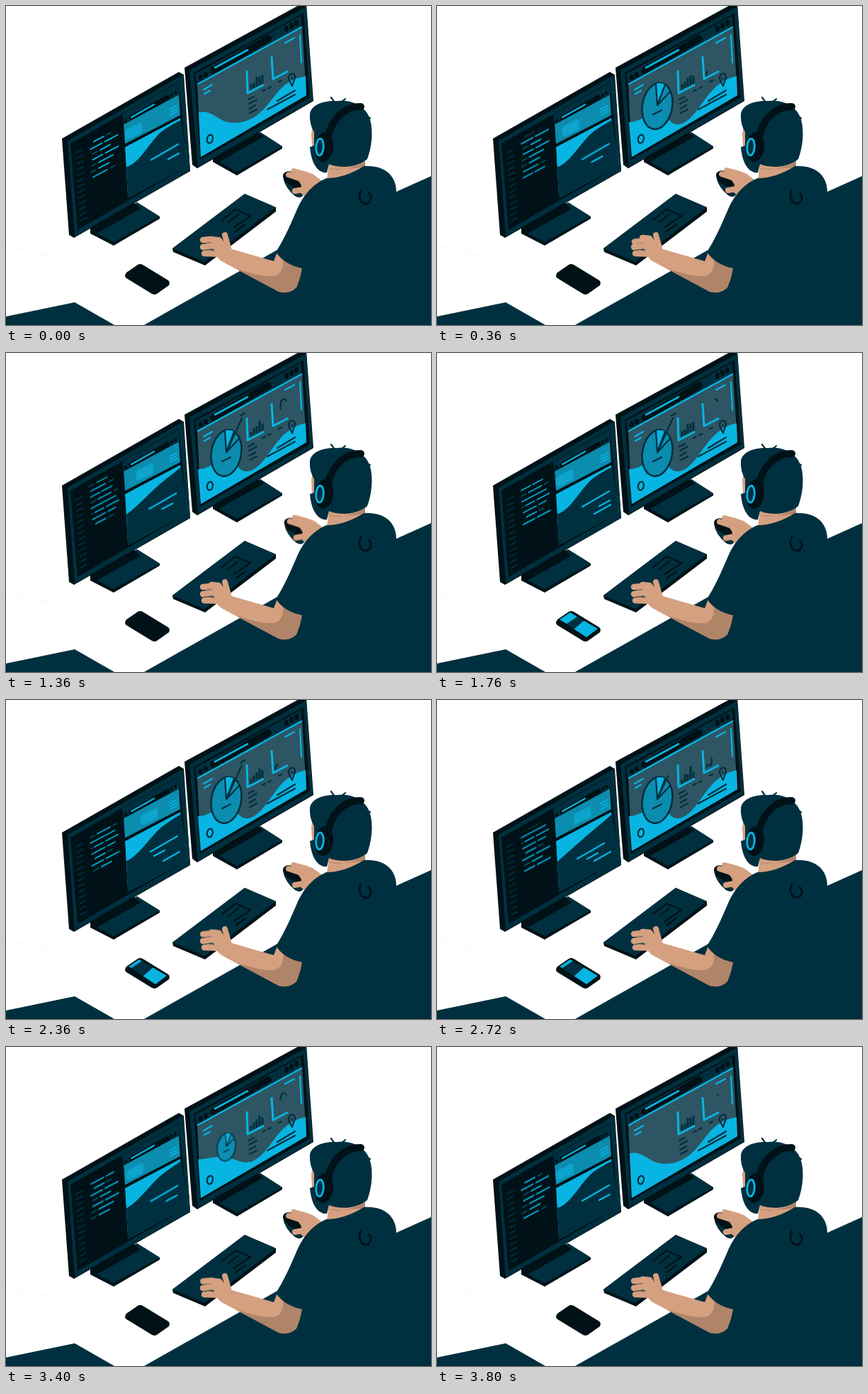
Animation, 600 px wide and 450 px high, one loop 3840 ms. Source, as an HTML page without scripts:

```html
<!DOCTYPE html>
<html lang="en">
<head>
<meta charset="utf-8">
<title>Developer at a desk</title>
<style>
  html, body { margin: 0; width: 100%; height: 100%; overflow: hidden; background: #fff; }
  svg { display: block; width: 600px; height: 450px; }
  .navy { fill: #00303f; }
  .ink { fill: #001217; }
  .cyan { fill: #08b4e2; }
  .skin { fill: #d5a080; }
  .line { fill: none; stroke-linecap: round; stroke-linejoin: round; stroke-width: 2.2; }
  .sNavy { stroke: #00303f; }
  .sInk { stroke: #001217; }
  .sCyan { stroke: #08b4e2; }
  .sDim { stroke: #075066; }
  .sSkin { stroke: #d5a080; stroke-width: 8.5; }

  .half { animation: 1920ms infinite; }
  .full { animation: 3840ms infinite; }

  .card { animation-name: card; animation-timing-function: ease-in-out; }
  @keyframes card {
    0%, 14%, 80%, 100% { transform: none; }
    26%, 64% { transform: translate(25px, -14px); }
  }
  .slideA { animation-name: slideA; }
  @keyframes slideA {
    0%, 18%, 84%, 100% { transform: none; }
    23% { transform: translate(-1px, -3px); }
    45%, 64% { transform: translate(-7px, 7px); }
  }
  .slideB { animation-name: slideB; }
  @keyframes slideB {
    0%, 8%, 88%, 100% { transform: none; }
    18% { transform: translate(-8px, 4px); }
    23% { transform: translate(-20px, 4px); }
    45%, 64% { transform: translate(-17px, 8px); }
  }
  .extra { animation-name: extra; stroke-dasharray: 1 2; }
  @keyframes extra {
    0%, 40% { stroke-dashoffset: 1; opacity: 0; }
    41% { opacity: 1; }
    45%, 84% { stroke-dashoffset: 0; opacity: 1; }
    88%, 100% { stroke-dashoffset: 1; opacity: 0; }
  }
  .code { animation-name: code; animation-timing-function: ease-in-out; }
  @keyframes code {
    0%, 4% { transform: none; }
    20%, 27% { transform: translateY(-32px); }
    42%, 50% { transform: translateY(-56px); }
    58%, 66% { transform: translateY(-64px); }
    76%, 82% { transform: translateY(-80px); }
    95%, 100% { transform: translateY(-96px); }
  }
  .pie { animation-name: pie; transform-origin: 311px 141px; animation-timing-function: ease-out; }
  @keyframes pie {
    0%, 2% { transform: scale(0); }
    8.5%, 84% { transform: none; animation-timing-function: ease-in; }
    92%, 100% { transform: scale(0); }
  }
  .callout { animation-name: callout; stroke-dasharray: 1 2; }
  @keyframes callout {
    0%, 12% { stroke-dashoffset: 1; opacity: 0; }
    13% { opacity: 1; }
    25%, 67% { stroke-dashoffset: 0; opacity: 1; }
    77% { stroke-dashoffset: .5; opacity: 1; }
    82%, 100% { stroke-dashoffset: 1; opacity: 0; }
  }
  .tip { animation-name: tip; }
  @keyframes tip {
    0%, 24% { opacity: 0; }
    26%, 66% { opacity: 1; }
    68%, 100% { opacity: 0; }
  }
  .trace { stroke-dasharray: 26 200; animation-name: trace; animation-timing-function: linear; }
  @keyframes trace {
    0%, 11% { stroke-dashoffset: 27; }
    99%, 100% { stroke-dashoffset: -61; }
  }
  .bars path { stroke-dasharray: 1 2; animation: bar 960ms infinite alternate ease-in-out; }
  .bars path:nth-child(even) { animation-direction: alternate-reverse; }
  @keyframes bar { to { stroke-dashoffset: .35; } }
  .phone { animation-name: phone; }
  @keyframes phone {
    0%, 41% { opacity: 0; }
    43%, 86% { opacity: 1; }
    88%, 100% { opacity: 0; }
  }
  .notice { animation-name: notice; }
  @keyframes notice {
    0%, 48% { transform: none; }
    56%, 100% { transform: translate(-6px, -4px); }
  }
  .mouse { animation-name: mouse; animation-timing-function: ease-in-out; }
  @keyframes mouse {
    0%, 3%, 44%, 100% { transform: none; }
    8%, 28% { transform: translate(3px, -1px); }
  }
  .tap { animation: tap 320ms infinite alternate ease-in-out; }
  .tap.late { animation-delay: -200ms; animation-duration: 240ms; }
  @keyframes tap { 0%, 50% { transform: none; } 100% { transform: translate(1px, 3px); } }
</style>
</head>
<body>
<svg viewBox="0 0 600 450" role="img" aria-label="Developer working at two monitors">
  <defs>
    <clipPath id="codeBox"><path d="M-4-6H46V50H-4Z"/></clipPath>
    <clipPath id="page"><path d="M166 167L244 125L257 225L172 271Z"/></clipPath>
    <clipPath id="phoneGlass"><path d="M173 376L188 366L227 389L211 401Z"/></clipPath>
    <g id="rows" class="line" style="stroke-width:1.900">
      <path class="sCyan" d="M7 0h14M2 8h16M22 8h18M15 16h14M4 24h14M22 24h18M12 32h20M12 40h14M3 48h20M2 56h13M18 56h14M12 64h18M2 72h34M7 80h12M23 80h17M3 88h18M25 88h10"/>
      <path class="sDim" d="M25 0h6M4 16h7M2 32h6M1 40h6M28 48h6M2 64h6M34 64h5M2 80h2"/>
    </g>
  </defs>

  <rect width="600" height="450" fill="#fff"/>
  <path d="M0 338L78 356" stroke="#ccc" stroke-width=".7" stroke-dasharray="1 4"/>
  <path class="navy" d="M0 438L97 418L153 450H0ZM195 450L383 344L551 262L600 240V450Z"/>

  <g id="stands">
    <path class="ink" d="M119 317L185 277L217 297V300L152 338L119 321Z"/>
    <path class="navy" d="M119 316L185 277L217 297L152 333Z"/>
    <path class="ink" d="M119 312L180 277L190 286L128 321L119 317Z"/>
    <path class="ink" d="M292 216L359 178L390 198V201L326 239L292 220Z"/>
    <path class="navy" d="M292 215L359 178L390 198L326 234Z"/>
    <path class="ink" d="M292 211L353 177L364 184L301 220L292 216Z"/>
  </g>

  <g id="leftMonitor">
    <path class="ink" d="M79 187L244 93L251 97L260 233L96 327L89 323Z"/>
    <path class="navy" d="M87 190L250 97L260 232L97 325Z"/>
    <path class="ink" d="M91 194L244 107L256 226L101 316Z"/>
    <g class="line sNavy" transform="matrix(1 -.5 .065 1 99 207)">
      <path d="M0 0h8M0 8h8M0 16h8M0 24h8M0 32h8M0 40h8M0 48h8M0 56h8M0 64h8M0 72h8M0 80h8M0 88h8M0 96h8"/>
    </g>
    <g transform="matrix(1 -.53 .06 1 117 195)">
      <g clip-path="url(#codeBox)">
        <g class="code full"><use href="#rows"/><use href="#rows" y="96"/></g>
      </g>
    </g>
    <path class="navy" d="M164 153L244 108L245 124L166 166Z"/>
    <path class="line sInk" style="stroke-width:7" d="M177 158L228 129"/>
    <path class="line sCyan" d="M177 157L209 139"/>
    <path class="line sInk" style="stroke-width:4" d="M169 161v1M234 125v1M239 122v1"/>
    <g clip-path="url(#page)">
      <path fill="#0c8caf" d="M166 167L244 125L246 155L168 196Z"/>
      <path class="cyan" d="M168 199L246 158L257 225L172 271Z"/>
      <path class="navy" d="M170 227C190 222 205 186 224 174C232 169 240 164 247 161L257 225L172 271Z">
        <animate attributeName="d" dur="1920ms" repeatCount="indefinite" calcMode="spline"
          keyTimes="0;.1;.45;.6;.92;1" keySplines="0 0 1 1;.4 0 .6 1;0 0 1 1;.4 0 .6 1;0 0 1 1"
          values="M170 227C190 222 205 186 224 174C232 169 240 164 247 161L257 225L172 271Z;M170 227C190 222 205 186 224 174C232 169 240 164 247 161L257 225L172 271Z;M170 228C188 212 206 196 224 181C232 174 240 168 247 161L257 225L172 271Z;M170 228C188 212 206 196 224 181C232 174 240 168 247 161L257 225L172 271Z;M170 227C190 222 205 186 224 174C232 169 240 164 247 161L257 225L172 271Z;M170 227C190 222 205 186 224 174C232 169 240 164 247 161L257 225L172 271Z"/>
      </path>
      <path class="ink" d="M167 195L246 154V157L168 199Z"/>
    </g>
    <path class="card half" fill="#0da4cd" d="M171 174L188 165Q192 163 192 167L193 175Q193 178 190 180L173 188Q169 190 168.500 186L168 179Q168 176 171 174Z"/>
    <path class="line sCyan" style="stroke-width:1.600" d="M231 146L241 140.500M231.500 150L242 144.500M232 154L242 148.500"/>
    <path class="line sCyan slideA half" d="M205 217L243 195"/>
    <path class="line sCyan slideB half" d="M229 216L244 208"/>
    <path class="line sCyan extra full" pathLength="1" d="M222 227L245 214"/>
  </g>

  <g id="rightMonitor">
    <path class="ink" d="M252 87L417-3H424L434 134L270 229L263 224Z"/>
    <path class="navy" d="M259 91L424 1L433 133L271 227Z"/>
    <path class="ink" d="M265 94L420 10L429 129L274 217Z"/>
    <path class="navy" d="M267 96L416 14L418 29L269 109Z"/>
    <path class="line sInk" style="stroke-width:10" d="M293 91L370 46"/>
    <path class="line sCyan" style="stroke-width:2.600" d="M295 87L341 62"/>
    <g class="ink">
      <ellipse cx="275" cy="101" rx="3" ry="4"/><ellipse cx="282" cy="97" rx="3" ry="4"/>
      <ellipse cx="396" cy="32" rx="3" ry="4.500"/><ellipse cx="403" cy="28" rx="3" ry="4.500"/><ellipse cx="410" cy="24" rx="3" ry="4.500"/>
    </g>
    <path fill="#2d5563" d="M270 110L418 29L424 126L275 213Z"/>
    <path class="cyan" d="M272 150C287 146 296 157 307 162C326 169 345 162 357 152C380 133 385 105 423 99L424 126L275 213Z">
      <animate attributeName="d" dur="3840ms" repeatCount="indefinite" keyTimes="0;.02;.085;.84;.96;1"
        values="M272 150C287 146 296 157 307 162C326 169 345 162 357 152C380 133 385 105 423 99L424 126L275 213Z;M272 150C287 146 296 157 307 162C326 169 345 162 357 152C380 133 385 105 423 99L424 126L275 213Z;M271 164C285 164 297 152 312 152C328 152 326 168 342 167C372 160 378 108 423 99L424 126L275 213Z;M271 164C285 164 297 152 312 152C328 152 326 168 342 167C372 160 378 108 423 99L424 126L275 213Z;M272 150C287 146 296 157 307 162C326 169 345 162 357 152C380 133 385 105 423 99L424 126L275 213Z;M272 150C287 146 296 157 307 162C326 169 345 162 357 152C380 133 385 105 423 99L424 126L275 213Z"/>
    </path>
    <path class="line sCyan" d="M271 110L417 30" style="stroke-width:2.500"/>
    <path class="line sCyan" d="M279 118L291 111M280 124L288 119.500M394 52L407 45M415 41L417 80"/>
    <path class="line sCyan" style="stroke-width:3;stroke-linecap:butt" d="M340 91L341 123L364 111M375 71L377 103L398 92"/>
    <g class="line sNavy bars" style="stroke-width:3;stroke-linecap:butt">
      <path pathLength="1" d="M346 118V110"/><path pathLength="1" d="M350 116V104"/>
      <path pathLength="1" d="M354 114V100"/><path pathLength="1" d="M358 112V93"/>
      <path pathLength="1" d="M362 110V97"/>
    </g>
    <path class="line sNavy trace half" pathLength="60" d="M380 98Q382 88 384 92C391 98 385 72 389 67Q392 62 396 68"/>
    <path class="line sNavy" d="M342 132L350 128M343 138L354 132M343.500 145L352 140M344 151L354 146M362 120L366 118M370 116L374 114M385 107L389 105"/>
    <path class="line sNavy" d="M369 146L408 125M383 134L408 119"/>
    <path class="line sNavy" d="M404 113C401 107 398 104 399 100C401 94 408 94 408 100C408 105 405 107 404 113Z"/>
    <ellipse class="line sNavy" cx="403.500" cy="102" rx="1" ry="1.500" style="stroke-width:1"/>
    <ellipse class="line sNavy" cx="288" cy="187.500" rx="4" ry="6" transform="rotate(12 288 187)"/>

    <g class="pie full">
      <ellipse cx="311" cy="141" rx="21" ry="33" transform="rotate(10 311 141)" fill="#0c8caf" stroke="#00303f" stroke-width="2.500"/>
      <path class="cyan" d="M309 110Q315 107 322 111L311 140Z"/>
      <path class="line sNavy" d="M309 110L311 140L322 111M311 140L329 121M305 153L317 147"/>
    </g>
    <path class="line sNavy callout full" pathLength="1" d="M312 138L333 92"/>
    <path class="line sNavy tip full" d="M331 88.500L337 85"/>
  </g>

  <g id="keyboard">
    <path class="ink" d="M235 342L337 265L381 284V290L281 366L236 347Z"/>
    <path class="navy" d="M235 342L337 265L381 284L280 361Z"/>
    <path class="line sInk" d="M305 302L324 287L345 296L337 302M314 305L328 294M322 312L335 303M324 318L338 308"/>
  </g>

  <g id="phone">
    <path class="ink" d="M170 376L186 365Q189 363 193 365L229 387Q232 389 230 394L213 406Q210 408 206 406L170 384Q166 381 170 376Z"/>
    <g class="phone full" clip-path="url(#phoneGlass)">
      <path class="navy" d="M170 376L188 364L228 389L211 402Z"/>
      <path class="cyan" d="M193 390L208 377L228 389L211 402Z"/>
      <path class="cyan notice full" d="M164 371L184 359L198 372L183 382Z"/>
    </g>
  </g>

  <g class="mouse full">
    <path class="ink" d="M391 241C390 233 401 231 408 236L422 258C422 268 416 273 408 268Q394 257 391 241Z"/>
    <path class="navy" d="M392 245Q401 256 420 260Q421 268 415 270Q397 262 392 245Z"/>
    <path class="line sSkin" style="stroke-width:8" d="M399 238L414 243M406 233L422 239M408 261L424 258"/>
    <path class="skin" d="M406 229Q420 232 433 237L452 251L426 273L416 264Q421 254 410 244Z"/>
  </g>

  <g id="leftArm">
    <path class="skin" d="M294 330Q309 329 319 343L378 360L383 347L420 370L410 397Q400 407 385 403L308 362Q290 353 294 330Z"/>
    <path fill="#b08469" d="M324 370Q362 383 378 381Q393 377 391 357L420 369L410 397Q400 407 385 403Z"/>
    <g class="line sSkin">
      <path class="tap" d="M278 330L290 329L302 335"/>
      <path d="M278 340L292 338L302 343M280 349L306 350"/>
      <path class="tap late" d="M290 327L300 328L307 338"/>
      <path d="M309 323L314 341" style="stroke-width:8"/>
    </g>
    <path class="line" stroke="#b08469" style="stroke-width:1" d="M282 335L291 334M284 344.500L294 344"/>
  </g>

  <g id="person">
    <path class="skin" d="M433 168L431 180L432 198L440 216L456 221L453 245L480 260L507 228V205L450 165Z"/>
    <path fill="#b08469" d="M455 229Q479 235 507 219V227L478 230Z"/>
    <path class="navy" d="M452 243Q478 243 505 226C535 224 552 240 551 264L600 241V450H405L412 398L418 370Q393 365 381 347C393 328 400 312 410 289C418 270 430 253 452 243Z"/>
    <path class="navy" d="M429 153C430 140 447 133 467 134C486 131 508 140 514 160C519 178 516 200 510 216C494 229 470 229 456 223L453 235C440 236 431 222 429 199L435 197V178Q428 166 429 153Z"/>
    <path class="line sNavy" d="M464 136L459 129M474 135L479 131M506 159Q510 156 514 158"/>
    <path class="line sInk" style="stroke-width:10" d="M455 187C457 164 476 141 501 142"/>
    <ellipse class="ink" cx="449" cy="199" rx="13" ry="21" transform="rotate(6 449 199)"/>
    <ellipse cx="443" cy="199" rx="5.300" ry="11.800" transform="rotate(4 443 199)" fill="#00303f" stroke="#08b4e2" stroke-width="2.800"/>
    <path class="line sInk" style="stroke-width:2.800" d="M501 260C496 269 501 279 509 279C516 277 517 268 512 264"/>
  </g>
</svg>
</body>
</html>
```
